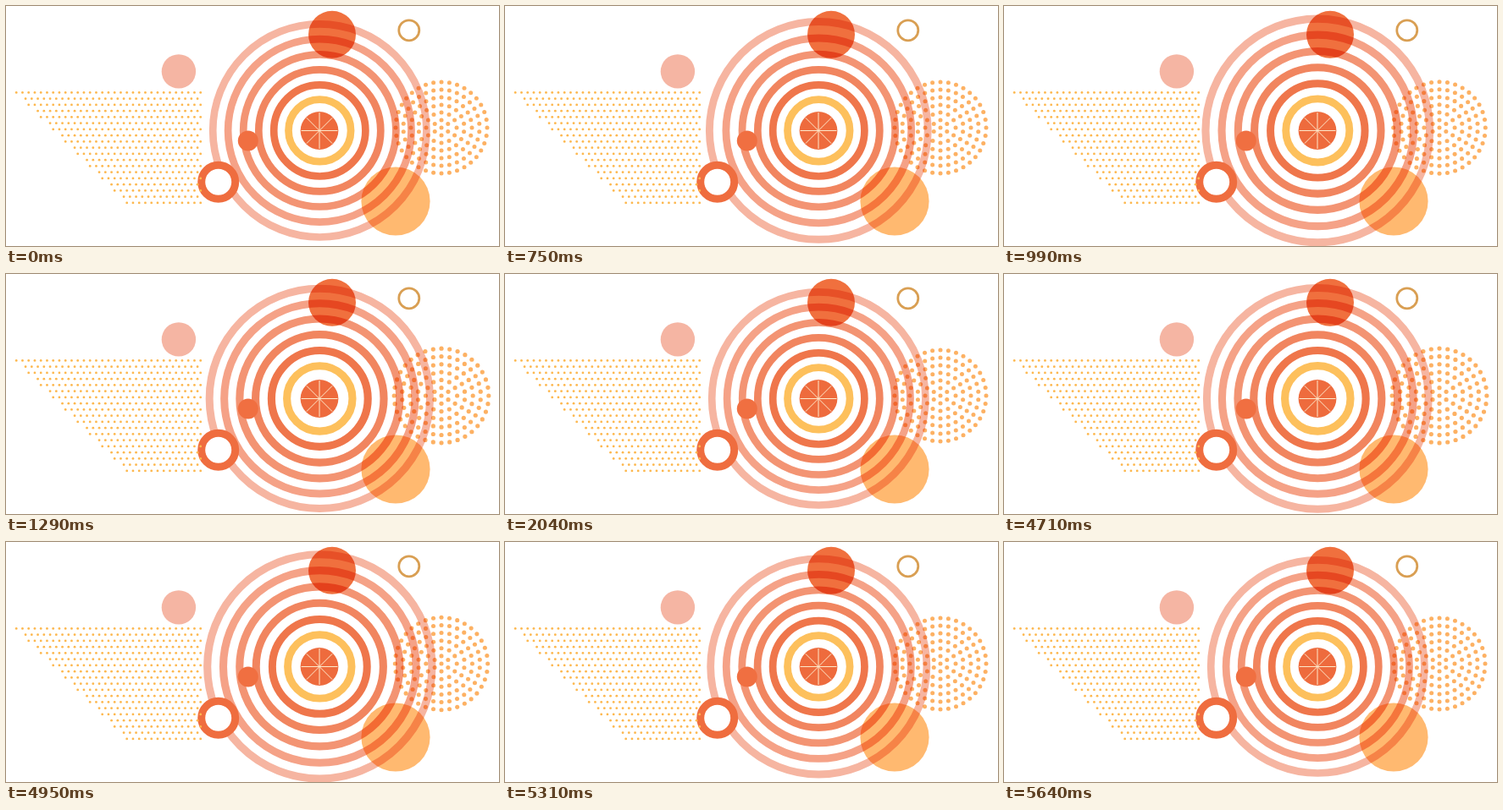
Animation, 582 px wide and 284 px high, one loop 7200 ms. Source, as an HTML page with a canvas:

```html
<!DOCTYPE html>
<html lang="en">
<head>
<meta charset="utf-8">
<title>Pulsing rings</title>
<style>
html, body { margin: 0; width: 100%; height: 100%; overflow: hidden; background: #fff; }
canvas { display: block; width: 582px; height: 284px; }
</style>
</head>
<body>
<canvas id="stage" width="582" height="284"></canvas>
<script>
const ctx = document.getElementById('stage').getContext('2d');
const TAU = Math.PI * 2;
const LOOP = 7200, STEP = 30;
const RISE = 520, FALL = 650, LAG = 50;
const RING_GROW = 0.052, DOT_GROW = 0.035;
const OUTWARD = 4185, INWARD = 615;   // start times of the two waves
const LAST = 6;                       // six rings, then the dotted disc

const CX = 370.3, CY = 147.4;
const rings = [
  [126.1, '#f6b5a1'], [108.2, '#f5a287'], [90.1, '#f39473'],
  [72, '#f1855f'], [54.1, '#ef764b'], [36.8, '#fdc05c']
];

// cubic-bezier(.25, .1, .25, 1)
function ease(x) {
  if (x <= 0) return 0;
  if (x >= 1) return 1;
  const at = (a, b, u) => 3 * a * u * (1 - u) ** 2 + 3 * b * u * u * (1 - u) + u ** 3;
  let lo = 0, hi = 1;
  for (let i = 0; i < 24; i++) {
    const mid = (lo + hi) / 2;
    if (at(0.25, 0.25, mid) < x) lo = mid; else hi = mid;
  }
  return at(0.1, 1, lo);
}

function pulse(t) {
  return t < RISE ? ease(t / RISE) : 1 - ease((t - RISE) / FALL);
}

function scaleOf(k, t, grow) {
  const wave = pulse(t - INWARD - k * LAG) + pulse(t - OUTWARD - (LAST - k) * LAG);
  return 1 + grow * wave;
}

function disc(x, y, r, color) {
  ctx.fillStyle = color;
  ctx.beginPath();
  ctx.arc(x, y, r, 0, TAU);
  ctx.fill();
}

function ring(x, y, r, width, color) {
  ctx.strokeStyle = color;
  ctx.lineWidth = width;
  ctx.beginPath();
  ctx.arc(x, y, r, 0, TAU);
  ctx.stroke();
}

// staggered rows behind a 45 degree edge
function dotField() {
  const gap = 7.25;
  for (let row = 0; row < 19; row++)
    for (let x = 12.2 + gap * (row + row % 2 / 2); x < 230.5; x += gap)
      disc(x, 102.4 + row * gap, 1.4, '#fdb84f');
}

function dotDisc(s) {
  const x = 514, y = 144, color = '#fdb163';
  disc(x, y, 2.5 * s, color);
  for (let i = 1; i <= 6; i++) {
    const n = i * 6, r = 9 * i * s;
    for (let j = 0; j < n; j++) {
      const a = j / n * TAU - TAU / 4;
      disc(x + r * Math.cos(a), y + r * Math.sin(a), 2.5 * s, color);
    }
  }
}

function slice() {
  const x = 370, y = 147.5;
  disc(x, y, 22.4, '#ee6b3d');
  ctx.strokeStyle = '#fee9cb';
  ctx.lineWidth = 1;
  ctx.beginPath();
  for (let i = 0; i < 4; i++) {
    const dx = 21.5 * Math.cos(i * TAU / 8), dy = 21.5 * Math.sin(i * TAU / 8);
    ctx.moveTo(x - dx, y - dy);
    ctx.lineTo(x + dx, y + dy);
  }
  ctx.stroke();
}

function draw(t) {
  ctx.globalCompositeOperation = 'source-over';
  ctx.fillStyle = '#fff';
  ctx.fillRect(0, 0, 582, 284);

  rings.forEach(([r, color], k) => {
    const s = scaleOf(k, t, RING_GROW);
    ring(CX, CY, r * s, 8.7 * s, color);
  });
  slice();

  ctx.globalCompositeOperation = 'multiply';
  dotDisc(scaleOf(LAST, t, DOT_GROW));
  disc(460, 231, 40.6, '#ffb970');
  disc(385, 33.8, 28, '#f0703e');

  ctx.globalCompositeOperation = 'source-over';
  disc(203.9, 77.4, 20.2, '#f5b5a3');
  disc(285.8, 159.6, 12, '#f06f41');
  disc(250.7, 208.2, 17, '#fff');
  ring(250.7, 208.2, 20, 9, '#ef6d3f');
  ring(475.8, 28.8, 12, 2.8, '#d99f53');
  dotField();
}

const start = performance.now();
function frame() {
  const t = (performance.now() - start) % LOOP;
  draw(Math.floor(t / STEP) * STEP);
  requestAnimationFrame(frame);
}
frame();
</script>
</body>
</html>
```
